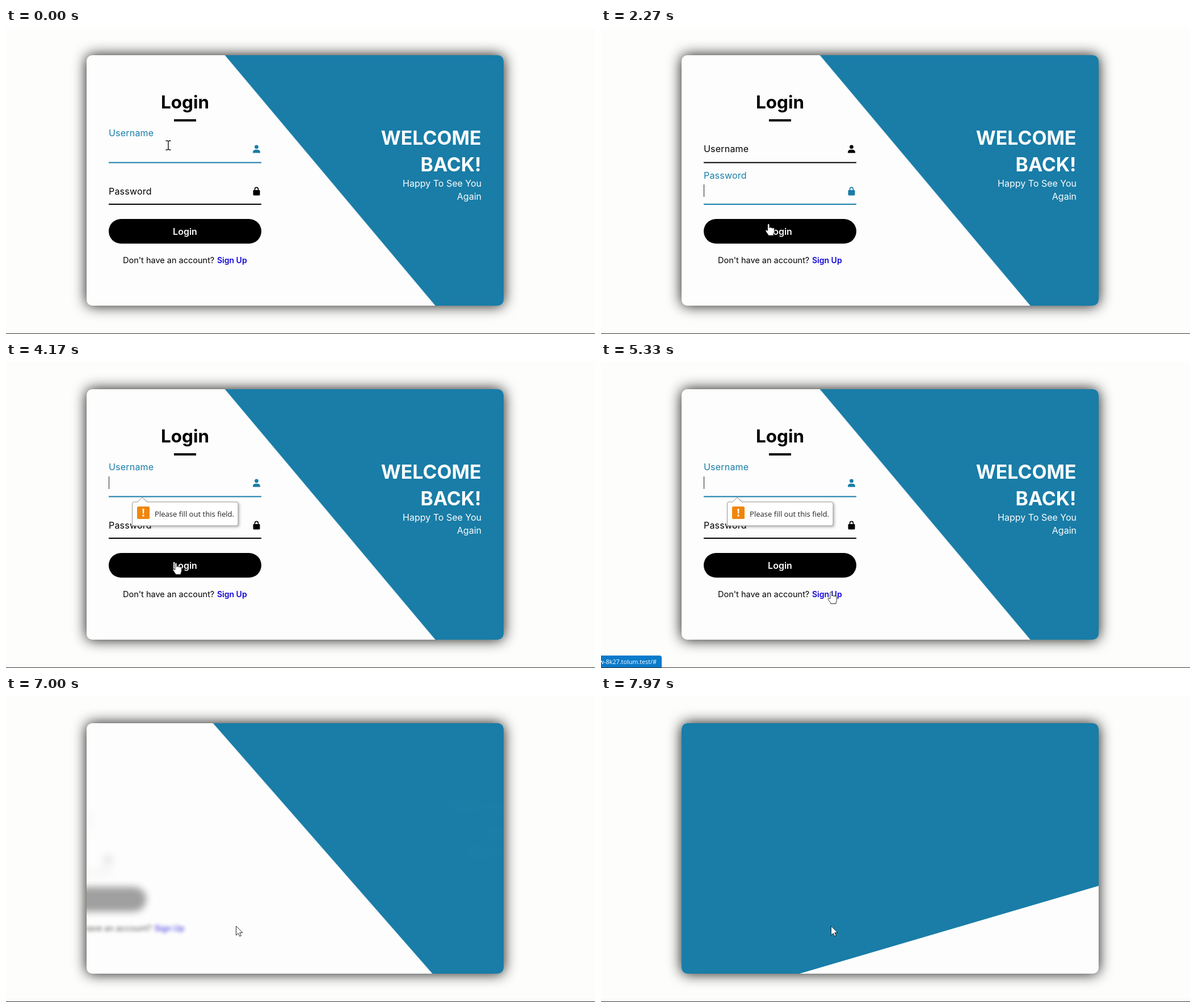
Write an HTML page that moves like this. It is 1038 by 540 pixels and loops after 8000 ms.

```html
<!DOCTYPE html>
<html lang="en">
<head>
<meta charset="utf-8">
<title>Login form</title>
<style>
  html, body { margin: 0; width: 100%; height: 100%; overflow: hidden; background: #fdfdfb; }
  svg { position: absolute; width: 1038px; height: 540px; display: block; }
  text { font-family: Inter, sans-serif; fill: currentColor; }
  #card {
    position: absolute; left: 142px; top: 48px; width: 735px; height: 442px;
    overflow: hidden; border-radius: 10px; background: #fdfdfd;
    box-shadow: 0 0 24.5px #000000f0;
  }
  #card svg { left: -142px; top: -48px; }
  #blue { fill: #197da7; transform-origin: 877px 633.5px; transform: rotate(10deg) skewY(40deg); }
  #white { fill: #fdfdfd; transform-origin: 387px 1176px; }
  .field { color: #000; fill: currentColor; }
  .label { font-size: 16px; letter-spacing: .2px; }
  #user { color: #197da7; }
  #user .label { transform: translateY(-28px); }
  .caret { fill: #222; }
  .mid { text-anchor: middle; }
  .info { color: #fdfdfd; text-anchor: end; }
  #tip { opacity: 0; transform-origin: 240px 239px; }
  #tip text, #status text { font-family: "Open Sans", sans-serif; }
  #status { opacity: 0; }
  #floor { position: absolute; left: 0; bottom: 0; width: 100%; height: 1px; background: #34382c; }
</style>
</head>
<body>
<div id="floor"></div>
<div id="card">
  <svg viewBox="0 0 1038 540">
    <rect id="blue" x="44" y="44" width="833" height="589.5"/>
    <rect id="white" x="387" y="490" width="833" height="686"/>

    <g class="item mid">
      <text x="315.5" y="142" font-size="31.4" font-weight="700">Login</text>
      <rect x="296" y="161" width="39" height="4"/>
    </g>
    <g class="item">
      <g id="user" class="field">
        <text class="label" x="181" y="218.5">Username</text>
        <rect x="181" y="236.5" width="269" height="2"/>
        <circle cx="441.5" cy="209.8" r="3.4"/>
        <path d="M435 220.5v-1.2c0-2.6 2-4.6 4.6-4.6h3.8c2.6 0 4.6 2 4.6 4.6v1.2z"/>
        <rect class="caret" x="181" y="202" width="1" height="22"/>
      </g>
    </g>
    <g class="item">
      <g id="pass" class="field">
        <text class="label" x="181" y="293.5">Password</text>
        <rect x="181" y="310" width="269" height="2"/>
        <rect x="435.5" y="286" width="12" height="9.5" rx="1.4"/>
        <path d="M438.5 287v-2.6a3 3 0 0 1 6 0v2.6" fill="none" stroke="currentColor" stroke-width="1.6"/>
        <rect class="caret" x="181" y="276" width="1" height="22"/>
      </g>
    </g>
    <g class="item mid">
      <rect x="181" y="337" width="269" height="43.5" rx="21.7"/>
      <text x="315.5" y="364.5" font-size="16" font-weight="600" color="#fdfdfd">Login</text>
    </g>
    <g class="item">
      <text x="206" y="415.3" font-size="14.5">Don't have an account?</text>
      <text x="372" y="415.3" font-size="14" font-weight="600" color="#1206d8">Sign Up</text>
    </g>

    <g class="info" font-size="33.8" font-weight="700">
      <text x="837.5" y="206">WELCOME</text>
      <text x="837.5" y="252.5">BACK!</text>
    </g>
    <g class="info" font-size="16">
      <text x="838" y="280">Happy To See You</text>
      <text x="838" y="303">Again</text>
    </g>
  </svg>
</div>

<svg viewBox="0 0 1038 540">
  <g id="tip">
    <path d="M225.5 247H232l8-8 8 8H406a3 3 0 0 1 3 3v36a3 3 0 0 1-3 3H225.5a3 3 0 0 1-3-3v-36a3 3 0 0 1 3-3z"
      fill="#fff" stroke="#999" style="filter:drop-shadow(2px 2px 2px #0004)"/>
    <rect x="231" y="255" width="22" height="22" rx="2" fill="#f0860c"/>
    <path d="M240.5 259h3l-.5 8.5h-2zM240.5 269.5h3v3h-3z" fill="#fff"/>
    <text x="262" y="273" font-size="13.1" color="#222">Please fill out this field.</text>
  </g>
  <g id="status">
    <path d="M0 518H103a4 4 0 0 1 4 4V539H0z" fill="#0a7aca"/>
    <text x="98" y="533" font-size="10.8" text-anchor="end" color="#fff">w-8k27.tolum.test/#</text>
  </g>
  <g id="cursor" fill="#fff" stroke="#111" stroke-width=".9" stroke-linejoin="round">
    <path id="beam" fill="none" stroke-width="1.4" d="M-4.5-8h3L0-7l1.5-1h3M0-7V7M-4.5 8h3L0 7l1.5 1h3"/>
    <path id="hand" d="M-1.7 12V1.5a1.6 1.6 0 0 1 3.2 0V7.2a1.5 1.5 0 0 1 3 .3a1.5 1.5 0 0 1 2.9.5a1.3 1.3 0 0 1 2.6.7V14c0 2-1.5 3-1.5 6.5H-.5c0-2-4.3-5.7-4.8-8.3-.3-1.8 1.6-2 2.3-.8z"/>
    <path id="arrow" d="M0 0V16.2L3.8 12.8 6.3 18 8.8 17 6.4 11.7H11.5z"/>
  </g>
</svg>

<script>
const LOOP = 8000, CLICK = 6447, BLINK = 530;
const BLUE = '#197da7', BLACK = '#000';
const $ = s => document.querySelector(s);
const $$ = s => document.querySelectorAll(s);

// Each step runs once per loop and holds its end state.
const steps = [];
function step(el, delay, duration, from, to, easing = 'ease') {
  const a = el.animate([from, to], { delay, duration, easing, fill: 'forwards' });
  a.pause();
  steps.push(a);
}

function focus(id, at, on) {
  const states = [
    [{ color: BLACK }, { transform: 'translateY(0px)' }],
    [{ color: BLUE }, { transform: 'translateY(-28px)' }]
  ];
  const from = states[on ? 0 : 1], to = states[on ? 1 : 0];
  step($(id), at, 500, from[0], to[0]);
  step($(id + ' .label'), at, 500, from[1], to[1]);
}
focus('#user', 960, false);
focus('#pass', 960, true);
focus('#pass', 2790, false);
focus('#user', 2888, true);
focus('#user', 6370, false);

const leave = dx => (el, i) => step(el, CLICK + 100 * i, 700,
  { transform: 'translateX(0px)', opacity: 1, filter: 'blur(0px)' },
  { transform: `translateX(${dx}px)`, opacity: 0, filter: 'blur(9.8px)' });
$$('.item').forEach(leave(-324));
$$('.info').forEach(leave(118));

step($('#blue'), CLICK + 495, 1500,
  { transform: 'rotate(10deg) skewY(40deg)' }, { transform: 'rotate(0deg) skewY(0deg)' });
step($('#white'), CLICK + 1211, 1500,
  { transform: 'rotate(0deg) skewY(0deg)' }, { transform: 'rotate(-11deg) skewY(-41deg)' });

step($('#tip'), 2890, 467, { opacity: 0, transform: 'scale(.9)' },
  { opacity: 1, transform: 'scale(1)' }, 'cubic-bezier(.4,0,.2,1)');
step($('#tip'), 6370, 140, { opacity: 1 }, { opacity: 0 });
step($('#status'), 5030, 120, { opacity: 0 }, { opacity: 1 }, 'linear');
step($('#status'), 6850, 150, { opacity: 1 }, { opacity: 0 }, 'linear');

// Caret spans: field, first visible moment, end of focus.
const carets = [['#user', 300, 960], ['#pass', 960, 2790], ['#user', 2888, 6370]];

// Cursor stops: time, x, y.
const path = [
  [0, 286, 207], [300, 286, 207], [850, 271, 293], [1700, 271, 293],
  [2450, 299.5, 354.5], [4200, 299.5, 354.5], [4950, 405.5, 406], [LOOP, 405.5, 406]
];
// Hot areas: cursor, left, top, right, bottom.
const areas = [
  ['beam', 181, 189, 450, 238], ['beam', 181, 263, 450, 312],
  ['hand', 181, 337, 450, 380], ['hand', 372, 400, 425, 421]
];

function drawCursor(t) {
  const i = path.findIndex(p => p[0] > t);
  const [t0, x0, y0] = path[i - 1], [t1, x1, y1] = path[i];
  const u = (t - t0) / (t1 - t0), k = u * u * (3 - 2 * u);
  const x = x0 + (x1 - x0) * k, y = y0 + (y1 - y0) * k;
  const hit = areas.find(([, l, top, r, b]) => x >= l && x <= r && y >= top && y <= b);
  const kind = hit && t < CLICK ? hit[0] : 'arrow';
  $('#cursor').setAttribute('transform', `translate(${x} ${y})`);
  for (const el of $('#cursor').children) el.style.display = el.id === kind ? '' : 'none';
}

function drawCarets(t) {
  for (const el of $$('.caret')) el.style.opacity = 0;
  for (const [id, from, to] of carets)
    if (t >= from && t < to && Math.floor((t - from) / BLINK) % 2 === 0)
      $(id + ' .caret').style.opacity = 1;
}

const start = performance.now();
function draw() {
  const t = (performance.now() - start) % LOOP;
  for (const a of steps) a.currentTime = t;
  drawCursor(t);
  drawCarets(t);
  requestAnimationFrame(draw);
}
draw();
</script>
</body>
</html>
```
